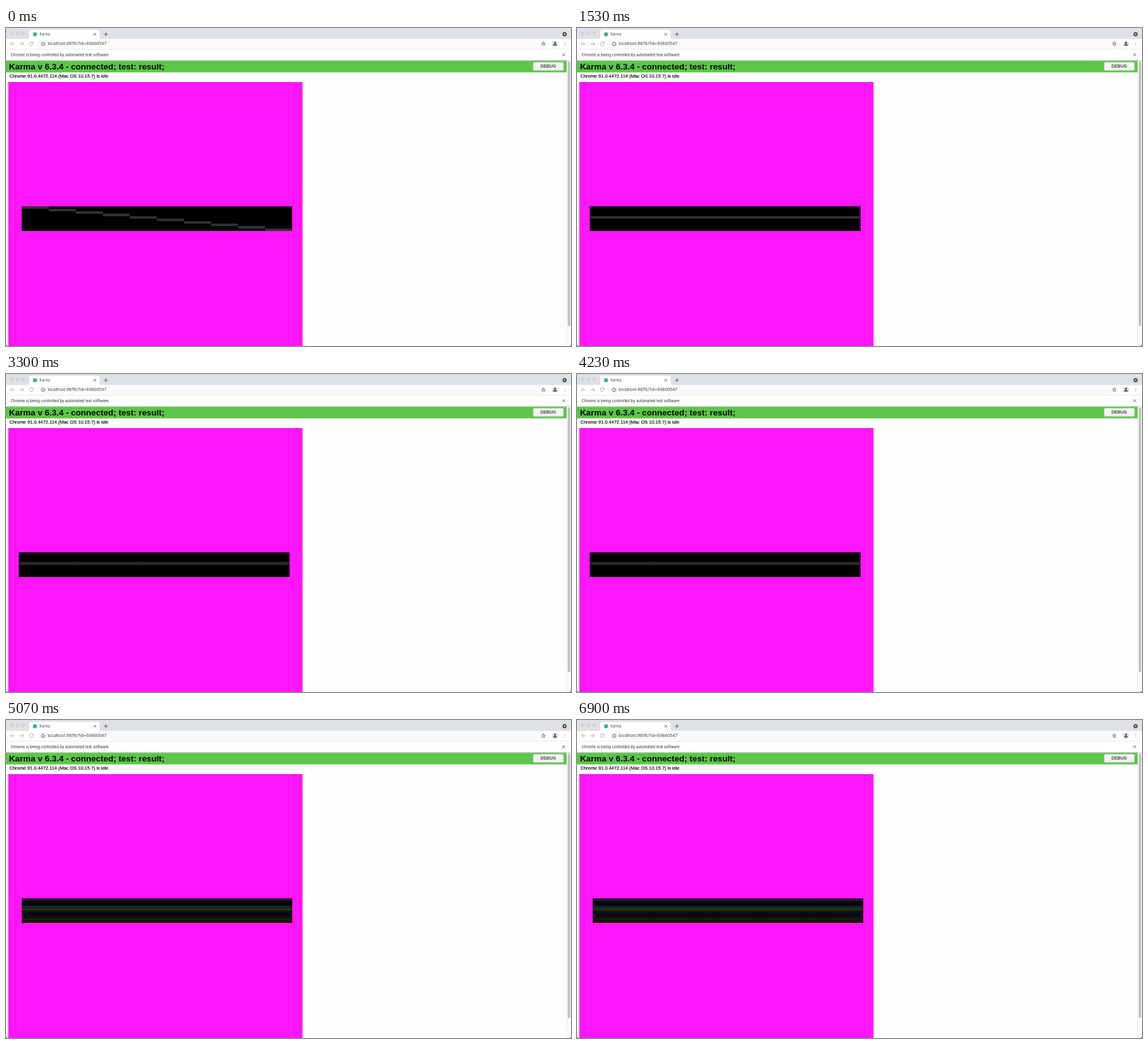
Animation of 900x506 px, one loop 8000 ms. Source, as an HTML page with a canvas:

```html
<!DOCTYPE html>
<html lang="en">
<head>
<meta charset="utf-8">
<title>Karma</title>
<style>
html, body { margin: 0; width: 100%; height: 100%; overflow: hidden; background: #fefdfe; }
canvas, svg { position: absolute; left: 0; top: 0; width: 900px; height: 506px; display: block; }
text { white-space: pre; }
.ui { font-family: Inter, Roboto, sans-serif; }
.page { font-family: "Liberation Sans", Arial, sans-serif; }
.line { fill: none; stroke-linecap: round; stroke-linejoin: round; }
</style>
</head>
<body>
<canvas id="view" width="900" height="506"></canvas>
<svg viewBox="0 0 900 506">
  <defs>
    <linearGradient id="face" x1="0" y1="0" x2="0" y2="1">
      <stop offset="0" stop-color="#fafafa"/><stop offset="1" stop-color="#ededed"/>
    </linearGradient>
  </defs>

  <!-- tab strip -->
  <rect width="900" height="18" fill="#dee1e6"/>
  <g fill="#d2d4d8" stroke="#c6c8cc" stroke-width=".5">
    <circle cx="9" cy="8.5" r="2.7"/><circle cx="18.2" cy="8.5" r="2.7"/><circle cx="27.4" cy="8.5" r="2.7"/>
  </g>
  <path d="M33.5 18Q37 18 37 14.500V6.500Q37 3 40.500 3H145.500Q149 3 149 6.500V14.500Q149 18 152.500 18Z" fill="#fff"/>
  <circle cx="46.200" cy="10" r="3.300" fill="#35b49a"/>
  <text class="ui" x="53.500" y="11.800" font-size="5.500" fill="#45494d">Karma</text>
  <g class="line" stroke="#4a4d51" stroke-width=".9">
    <path d="M139.800 8.200l3.400 3.400m0-3.400l-3.400 3.400"/>
    <path d="M156.300 10h5.600m-2.800-2.800v5.600"/>
  </g>
  <circle cx="889.700" cy="9.900" r="3.300" fill="#4c4f53"/>
  <path d="M888 9.100h3.400l-1.700 2z" fill="#fff"/>

  <!-- toolbar -->
  <rect y="17.500" width="900" height="16" fill="#fff"/>
  <rect x="51" y="18.700" width="813" height="13" rx="6.500" fill="#f8f9fa"/>
  <g class="line" stroke="#a5a7aa" stroke-width=".9">
    <path d="M13.300 25H7.200m2.900-2.900L7.200 25l2.900 2.900"/>
    <path d="M22 25h6.100m-2.900-2.900l2.900 2.900-2.900 2.900"/>
    <path d="M42.800 23.400A3 3 0 1 0 43.100 26M43.200 21.900v2h-2"/>
  </g>
  <g class="line" stroke="#53575b" stroke-width=".75">
    <circle cx="59" cy="25.200" r="2.900"/>
    <path d="M59 25v1.700M59 23.700v.1"/>
    <path d="M856 22.100l.85 2 2.150.2-1.650 1.400.5 2.100-1.850-1.150-1.850 1.150.5-2.100-1.650-1.400 2.150-.2z"/>
  </g>
  <text class="ui" x="66.500" y="27.300" font-size="6.550" fill="#3f4246">localhost:9876/?id=93660547</text>
  <circle cx="874.500" cy="25" r="5" fill="#dadce2"/>
  <g fill="#3e4247">
    <circle cx="874.500" cy="23.500" r="1.500"/>
    <path d="M871.600 27.800v-.7q0-1.500 2.900-1.500t2.900 1.500v.7z"/>
  </g>
  <g fill="#8c8f93">
    <circle cx="890" cy="22.900" r=".6"/><circle cx="890" cy="25.100" r=".6"/><circle cx="890" cy="27.300" r=".6"/>
  </g>

  <!-- info bar -->
  <rect y="33.100" width="900" height=".8" fill="#dcdde0"/>
  <rect y="33.900" width="900" height="17.600" fill="#fff"/>
  <text class="ui" x="7.500" y="44.900" font-size="6.020" fill="#26282b">Chrome is being controlled by automated test software.</text>
  <path class="line" d="M886.500 40.800l3.600 3.600m0-3.600l-3.600 3.600" stroke="#44474b" stroke-width=".9"/>
  <rect y="51.300" width="900" height="1" fill="#b3b6b5"/>

  <!-- page header -->
  <rect y="52.300" width="893" height="18.300" fill="#5cc649"/>
  <text class="page" x="4.800" y="65.800" font-size="13.480" font-weight="700" fill="#030803">Karma v 6.3.4 - connected; test: result;</text>
  <rect x="839.800" y="54.600" width="48.200" height="13" rx="1.800" fill="url(#face)" stroke="#c3cdc0" stroke-width=".6"/>
  <text class="page" x="863.700" y="63.300" font-size="6.900" font-weight="700" text-anchor="middle" fill="#444">DEBUG</text>
  <text class="page" x="5.500" y="78.900" font-size="7.460" fill="#000" stroke="#000" stroke-width=".15">Chrome 91.0.4472.114 (Mac OS 10.15.7) is idle</text>

  <!-- scrollbar -->
  <rect x="893" y="52.300" width="7" height="454" fill="#fafafa"/>
  <rect x="893" y="52.300" width=".6" height="454" fill="#e6e6e6"/>
  <rect x="894.800" y="53.200" width="4" height="421" rx="2" fill="#c1c1c1"/>

  <!-- window corners -->
  <path d="M0 503v3h3Q0 506 0 503zM900 503v3h-3q3 0 3-3z" fill="#4a4a4a"/>
</svg>
<script>
const ctx = document.getElementById("view").getContext("2d");
const LOOP = 8000;
const BAR = { y: 283.8, w: 430.8, h: 39.2 };
const ROW = BAR.h / 10;
const COL = BAR.w / 10;
const GREY = "#343434";
const BANDS = ["#252228", "#06061e", "#000000", "#042e2e", "#382b08",
               "#02180a", "#02022c", "#200306", "#062c06", "#310608"];
const LINE = BANDS.map((_, i) => i === 4 ? GREY : "#000000");

function box(color, x, y, w, h) {
  ctx.fillStyle = color;
  ctx.fillRect(x, y, w, h);
}

function stairs(x) {
  for (let i = 0; i < 10; i++) box(GREY, x + i * COL, BAR.y + i * ROW, COL, ROW);
}

function rows(x, colors) {
  colors.forEach((c, i) => box(c, x, BAR.y + i * ROW, BAR.w, ROW));
}

// colours blend between the row centres
function blend(x, colors) {
  const g = ctx.createLinearGradient(0, BAR.y, 0, BAR.y + BAR.h);
  colors.forEach((c, i) => g.addColorStop((i + 0.5) / 10, c));
  box(g, x, BAR.y, BAR.w, BAR.h);
}

const SCENES = [
  { from: 0, to: 1370, x: 25, draw: stairs },
  { from: 1530, to: 3130, x: 20.6, draw: x => rows(x, LINE) },
  { from: 3300, to: 4870, x: 20.6, draw: x => blend(x, LINE) },
  { from: 5070, to: 6630, x: 25, draw: x => rows(x, BANDS) },
  { from: 6830, to: LOOP, x: 25, draw: x => blend(x, BANDS) }
];

function paint(t) {
  box("#fefdfe", 0, 0, 900, 506);
  const scene = SCENES.find(s => t >= s.from && t < s.to);
  if (!scene) return;
  box("#ff16fa", 3.6, 86, 468.8, 420);
  box("#000", scene.x, BAR.y, BAR.w, BAR.h);
  scene.draw(scene.x);
}

const start = performance.now();
function tick() {
  paint((performance.now() - start) % LOOP);
  requestAnimationFrame(tick);
}
tick();
</script>
</body>
</html>
```
